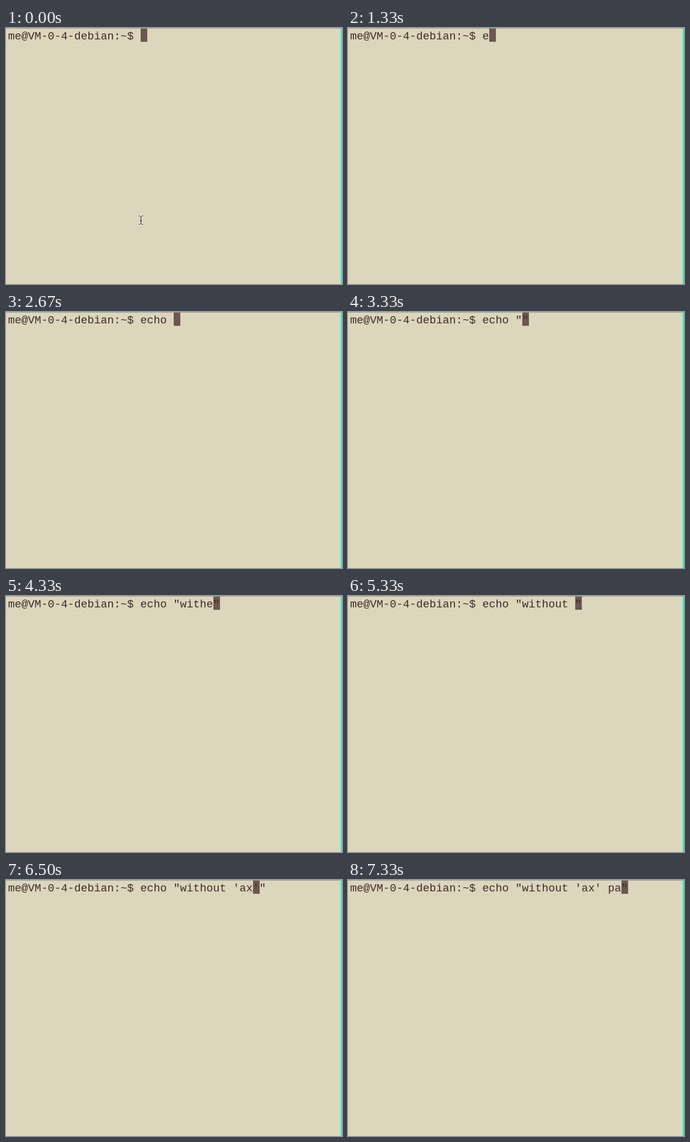
An HTML page that plays this animation: 559 px wide and 427 px high, repeating every 8000 ms.

```html
<!DOCTYPE html>
<html lang="en">
<head>
<meta charset="utf-8">
<title>Terminal typing</title>
<style>
  html, body { margin: 0; width: 100%; height: 100%; overflow: hidden; background: #dbd6bc; }
  svg { display: block; }
  text { font: 18.333px "Liberation Mono", monospace; fill: #402b28; white-space: pre; }
</style>
</head>
<body>
<svg width="559" height="427">
  <rect width="559" height="1" fill="#a09c92"/>
  <rect x="557" width="2" height="427" fill="#2ce5c3"/>
  <rect id="cursor" y="1" width="11" height="22" fill="#6b584f"/>
  <text id="line" x="3.5" y="19"></text>
  <g id="pointer" fill="none">
    <path id="beam" d="M221 313.5h2l1.5 1.5l1.5-1.5h2M221 327.5h2l1.5-1.5l1.5 1.5h2M224.5 315v11M223 321.5h3" stroke="#f4f1e4" stroke-width="2.4"/>
    <use href="#beam"/>
    <path d="M221 313.5h2l1.5 1.5l1.5-1.5h2M221 327.5h2l1.5-1.5l1.5 1.5h2M224.5 315v11M223 321.5h3" stroke="#111"/>
  </g>
</svg>
<script>
const LOOP = 8000, TICK = 1000 / 6, CELL = 11, LEFT = 4;
const PROMPT = "me@VM-0-4-debian:~$ ";
const $ = id => document.getElementById(id);

// Bursts of typing: first tick, then the keys of each tick.
// "<" backspace, "[" cursor left, "]" cursor right
const bursts = [
  [8, ["e", "c", "h", " "]],
  [14, ["<<", "ho", " "]],
  [18, ['"', '"', "["]],
  [23, ["w", "i", "th", "e"]],
  [29, ["<", "o", "ut", " ", "'", "'", "["]],
  [38, ["a", "x"]],
  [41, ["]", " ", "p", "a"]]
];

function stateAt(tick) {
  let text = "", pos = 0;
  for (const [start, steps] of bursts)
    for (const key of steps.slice(0, Math.max(0, tick - start + 1)).join("")) {
      if (key === "[") pos--;
      else if (key === "]") pos++;
      else if (key === "<") {
        text = text.slice(0, pos - 1) + text.slice(pos);
        pos--;
      } else {
        text = text.slice(0, pos) + key + text.slice(pos);
        pos++;
      }
    }
  return { text, pos };
}

function draw(now) {
  const tick = Math.floor((now % LOOP + 5) / TICK);
  const { text, pos } = stateAt(tick);
  $("line").textContent = PROMPT + text;
  $("cursor").setAttribute("x", LEFT + (PROMPT.length + pos) * CELL);
  $("pointer").style.display = tick % 48 < bursts[0][0] ? "" : "none";
}

const begin = performance.now();
function frame() {
  draw(performance.now() - begin);
  requestAnimationFrame(frame);
}
frame();
</script>
</body>
</html>
```
